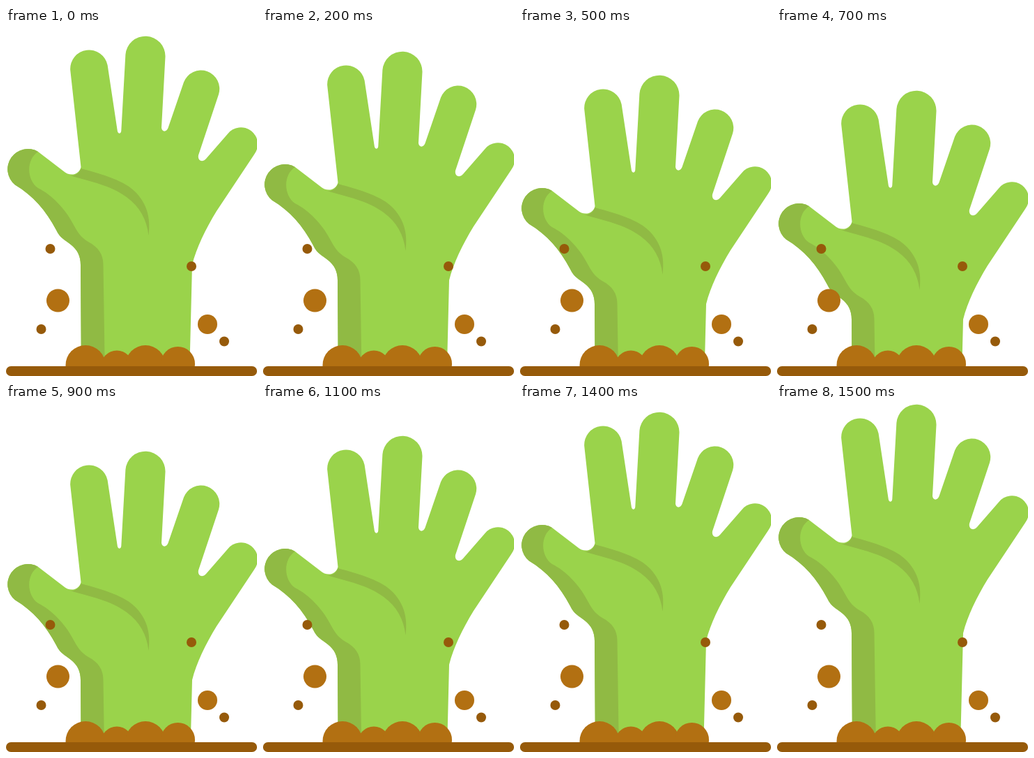
An HTML page with a canvas that plays this animation: 360x498 px, repeating every 1600 ms.

```html
<!DOCTYPE html>
<html lang="en">
<head>
<meta charset="utf-8">
<title>Rising hand</title>
<style>
  html, body { margin: 0; width: 100%; height: 100%; overflow: hidden; background: #fff; }
  canvas { display: block; }
</style>
</head>
<body>
<canvas id="stage" width="360" height="498"></canvas>
<script>
const ctx = document.getElementById('stage').getContext('2d');
const SKIN = '#9ad34b', SHADE = '#90ba44', SOIL = '#b27012', EARTH = '#965a0a';
const STEP_MS = 100, STEPS = 16, RISE = 11.15, GROUND = 484;

const hand = new Path2D(`
  M108 490 L107 328 C107 315 102 306 93 299 C84 292 77 289 72 278
  C57 250 39 229 13 213.5 A29 29 0 0 1 46 166
  L82 193.5 C92 202.5 105 199 107.5 188
  L92.2 49 A27 27 0 0 1 145.6 42
  L159.8 136 C160.5 141 165 141 165.3 136
  L171.4 27 A28.6 28.6 0 0 1 228.5 30
  L223 131.5 C223.5 138 230 138.5 232.5 132
  L255 66.5 A26.5 26.5 0 0 1 305 84
  L276 171 C274.5 178 281 182.5 287 176
  L318 140.5 A24 24 0 0 1 356 170
  L302 251 C286 277 273 304 267 328 L263 490 Z`);

const thumbShade = new Path2D(`
  M108 490 L107 328 C107 315 102 306 93 299 C84 292 77 289 72 278
  C57 250 39 229 13 213.5 A29 29 0 0 1 46 166
  C29 177 29 206 46 218 C66 228 85 248 96 269
  C103 282 107 288 118 295 C133 303 139.5 313 139.5 328 L142 490 Z`);

const crease = new Path2D(`
  M107.5 190 C140 199 170 207 187 225 C205 245 207 265 204.5 286
  C202 263 192 245 173 231 C150 214 121 209 92 200 C99 201 105 197 107.5 190 Z`);

// [x, y, radius, color]
const mound = [
  [114, 482.5, 28.5, SOIL], [159, 484.5, 23, SOIL],
  [200, 482.5, 28.5, SOIL], [246.5, 480.5, 24.5, SOIL]
];
const clods = [
  [63.5, 316, 7, EARTH], [74.5, 390, 16.5, SOIL], [50.5, 431, 7, EARTH],
  [266, 341, 7, EARTH], [289, 424, 14, SOIL], [313, 448.5, 7, EARTH]
];

function fill(path, color) {
  ctx.fillStyle = color;
  ctx.fill(path);
}

function disc([x, y, r, color]) {
  ctx.fillStyle = color;
  ctx.beginPath();
  ctx.arc(x, y, r, 0, Math.PI * 2);
  ctx.fill();
}

// Triangle wave in discrete steps: the hand sinks, then rises.
function sinkAt(ms) {
  const step = (Math.floor(ms / STEP_MS) + 1) % STEPS;
  return Math.round(RISE * Math.min(step, STEPS - step));
}

function draw(ms) {
  ctx.fillStyle = '#fff';
  ctx.fillRect(0, 0, 360, 498);

  ctx.save();
  ctx.beginPath();
  ctx.rect(0, 0, 360, GROUND);
  ctx.clip();
  ctx.translate(0, sinkAt(ms));
  fill(hand, SKIN);
  fill(thumbShade, SHADE);
  fill(crease, SHADE);
  ctx.restore();

  ctx.save();
  ctx.beginPath();
  ctx.rect(0, 0, 360, GROUND);
  ctx.clip();
  mound.forEach(disc);
  ctx.fillStyle = SOIL;
  ctx.fillRect(88, 476, 181, 8);
  ctx.restore();

  clods.forEach(disc);
  ctx.fillStyle = EARTH;
  ctx.beginPath();
  ctx.roundRect(0, GROUND, 360, 14, 7);
  ctx.fill();
}

const start = performance.now();
function tick() {
  draw(performance.now() - start);
  requestAnimationFrame(tick);
}
tick();
</script>
</body>
</html>
```
